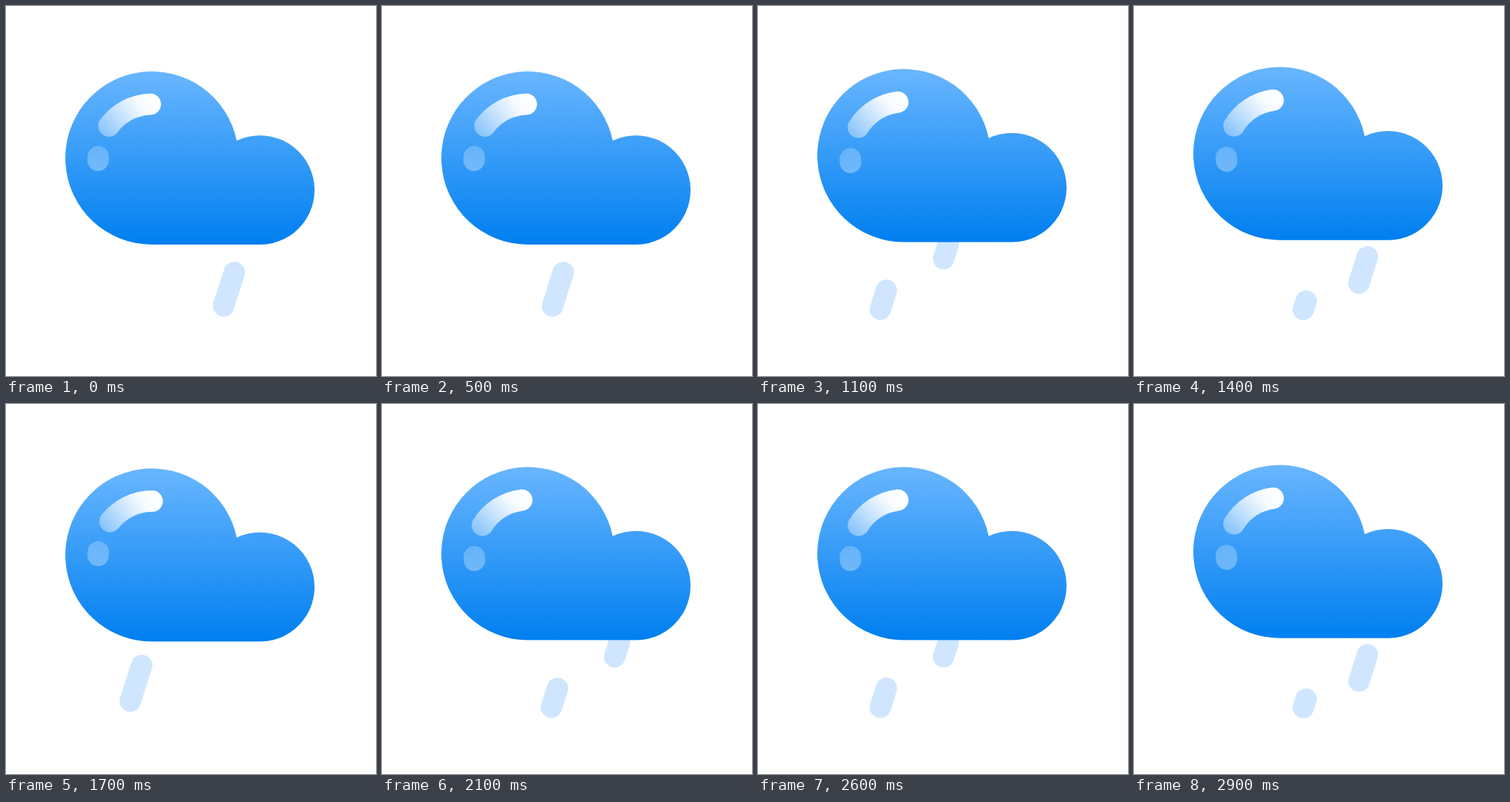
An HTML page that plays this animation: 518 px wide and 518 px high, repeating every 3000 ms.

```html
<!DOCTYPE html>
<html lang="en">
<head>
<meta charset="utf-8">
<title>Rain cloud</title>
<style>
  html, body { margin: 0; width: 100%; height: 100%; overflow: hidden; background: #fff; }
  svg { display: block; width: 100vw; height: 100vh; }
</style>
</head>
<body>
<svg viewBox="0 0 518 518">
  <defs>
    <linearGradient id="sky" gradientUnits="userSpaceOnUse" x1="0" y1="91" x2="0" y2="334">
      <stop offset="0" stop-color="#69b6ff"/>
      <stop offset="1" stop-color="#007ff0"/>
    </linearGradient>
    <linearGradient id="gloss" gradientUnits="userSpaceOnUse" x1="212" y1="134" x2="138" y2="184">
      <stop offset="0" stop-color="#fff"/>
      <stop offset=".25" stop-color="#fff" stop-opacity=".95"/>
      <stop offset="1" stop-color="#fff" stop-opacity=".36"/>
    </linearGradient>
    <linearGradient id="glint" gradientUnits="userSpaceOnUse" x1="0" y1="196" x2="0" y2="231">
      <stop offset="0" stop-color="#fff" stop-opacity=".23"/>
      <stop offset="1" stop-color="#fff" stop-opacity=".33"/>
    </linearGradient>
  </defs>
  <g id="rain" fill="none" stroke="#d0e6ff" stroke-width="30" stroke-linecap="round"></g>
  <g id="cloud">
    <path fill="url(#sky)" d="M204 334A121.2 121.2 0 1 1 323 188.5A76.4 76.4 0 1 1 356.6 334Z"/>
    <g id="shine" fill="none" stroke-width="30" stroke-linecap="round">
      <path stroke="url(#gloss)" d="M144 168A75 75 0 0 1 202 137.5"/>
      <path stroke="url(#glint)" d="M129 216L129.1 211"/>
    </g>
  </g>
</svg>
<script>
const LOOP = 3000, FRAME = 100, STEP = 50;
const DROP_CYCLE = 750, BEAT = 250;

// One value per STEP ms.
const bob = [0, 0.5, -3.4, -6.2, -1.4];
const spin = [0, -2.3, -4.8, -5.5, 2];
const tail = [318, 334, 351, 366, 373, 385, 398, 413, 427];
const head = [318, 354, 388, 416, 420, 423, 424.5, 425, 425];

// Delay of the beat and sideways shift of each drop.
const drops = [
  { delay: 0, dx: 0 },
  { delay: 250, dx: -132 },
  { delay: 500, dx: -66 }
];

const byId = id => document.getElementById(id);
const rain = byId("rain"), cloud = byId("cloud"), shine = byId("shine");
const mod = (a, n) => ((a % n) + n) % n;

for (const drop of drops) {
  drop.el = document.createElementNS("http://www.w3.org/2000/svg", "path");
  rain.appendChild(drop.el);
}

function sample(list, t, wrap) {
  const p = t / STEP, i = Math.floor(p), n = list.length;
  const a = list[i], b = wrap ? list[(i + 1) % n] : list[Math.min(i + 1, n - 1)];
  return a + (b - a) * (p - i);
}

const slope = (y, dx) => `${304 + dx + (422 - y) * 0.32} ${y}`;

function draw(t) {
  const beat = mod(t, BEAT);
  cloud.setAttribute("transform", `translate(0 ${sample(bob, beat, true)})`);
  shine.setAttribute("transform", `rotate(${sample(spin, beat, true)} 204 213)`);

  for (const { el, delay, dx } of drops) {
    const age = mod(t - delay + 200, DROP_CYCLE);
    const life = (tail.length - 1) * STEP;
    const top = age < life ? sample(tail, age) : 0;
    const end = age < life ? sample(head, age) : 0;
    el.setAttribute("d", end > top ? `M${slope(top, dx)}L${slope(end, dx)}` : "");
  }
}

const start = performance.now();
function tick() {
  const t = (performance.now() - start) % LOOP;
  draw(Math.floor(t / FRAME) * FRAME);
  requestAnimationFrame(tick);
}
tick();
</script>
</body>
</html>
```
